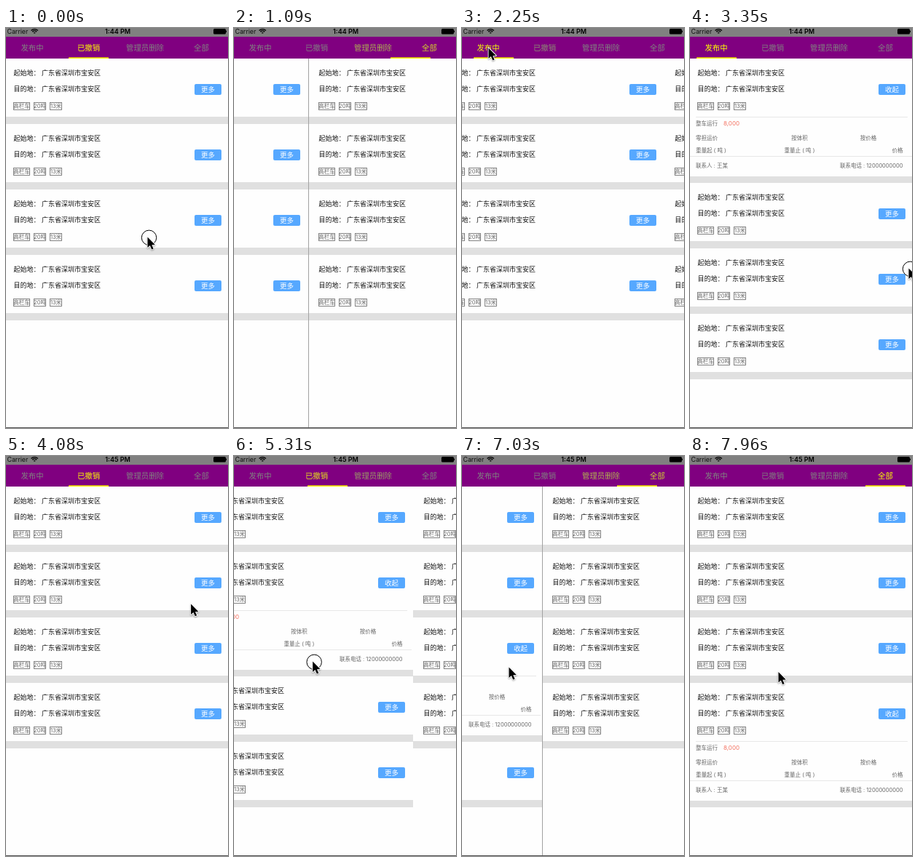
Animation of 305 by 550 pixels, one loop 8 s. Source, as an HTML page with a canvas:

```html
<!DOCTYPE html>
<html lang="zh-CN">
<head>
<meta charset="utf-8">
<title>Order tabs</title>
<style>
html, body { margin: 0; width: 100%; height: 100%; overflow: hidden; background: #fefefe; }
canvas { display: block; width: 305px; height: 550px; }
</style>
</head>
<body>
<canvas id="stage"></canvas>
<script>
const W = 305, H = 550, LOOP = 8000;
const PAGE_STEP = 311, PAGE_LEFT = -4;
const LIST_TOP = 42, ROW = 90, DETAIL = 81;
const TAB_X = 36, TAB_STEP = 77.5;
const FONT = 'Inter, "Noto Sans CJK SC", "Noto Sans CJK", "Noto Sans CJK JP", sans-serif';
const TABS = ['发布中', '已撤销', '管理员删除', '全部'];
const TAGS = ['高栏车', '20吨', '13米'];

// Gesture timing in ms, distances in px.
const HOLD = 60, DRAG = 150, SETTLE = 330, PRESS = 100, LEAD = 40;
const REACH = 130, SLOP = 8;
const CLOCK_CHANGE = 3720;

const clamp = u => Math.min(1, Math.max(0, u));
const easeOut = u => 1 - (1 - u) ** 3;
const easeBoth = u => (1 - Math.cos(Math.PI * u)) / 2;

const swipe = (at, x, y) => ({ at, x, y, drag: true, press: HOLD + DRAG, rest: SETTLE });
const pickTab = (at, tab) => ({ at, x: TAB_X + TAB_STEP * tab, y: 27, tab, press: PRESS, rest: SETTLE });
const toggle = (at, row) => ({ at, x: 274, y: LIST_TOP + ROW * row + 40, row, press: PRESS, rest: 0 });
const moveTo = (at, x, y) => ({ at, x, y, press: 0, rest: 0 });

const GESTURES = [
  swipe(0, 194, 287),
  swipe(823, 104, 287),
  pickTab(1858, 0),
  toggle(2580, 0),
  swipe(3330, 300, 330),
  toggle(4208, 1),
  swipe(5171, 177, 282),
  toggle(6270, 2),
  swipe(6770, 194, 290),
  toggle(7540, 3),
  moveTo(LOOP, 121, 296.5)
];

const canvas = document.getElementById('stage');
const ctx = canvas.getContext('2d');
const dpr = window.devicePixelRatio || 1;
canvas.width = W * dpr;
canvas.height = H * dpr;

// Replays the gestures up to time t.
function stateAt(t) {
  const s = { page: 1, x: 0, y: 0, pressed: false, open: [] };
  let free = 0;
  for (const g of GESTURES) {
    if (t < g.at) {
      const u = easeBoth(clamp((t - free) / (g.at - LEAD - free)));
      s.x += (g.x - s.x) * u;
      s.y += (g.y - s.y) * u;
      break;
    }
    const age = t - g.at;
    const settle = clamp((age - g.press) / SETTLE);
    s.x = g.x;
    s.y = g.y;
    s.pressed = age < g.press;
    if (g.drag) {
      const moved = REACH * clamp((age - HOLD) / DRAG);
      const dragged = Math.max(0, moved - SLOP) / PAGE_STEP;
      s.x -= moved;
      s.page += dragged + (1 - dragged) * easeOut(settle);
    }
    if (g.tab !== undefined) s.page += (g.tab - s.page) * easeBoth(settle);
    if (g.row !== undefined && !s.pressed) s.open.push(g.row);
    free = g.at + g.press + g.rest;
  }
  return s;
}

function rect(x, y, w, h, color) {
  ctx.fillStyle = color;
  ctx.fillRect(x, y, w, h);
}

function pill(x, y, w, h, r, color) {
  ctx.fillStyle = color;
  ctx.beginPath();
  ctx.roundRect(x, y, w, h, r);
  ctx.fill();
}

function text(str, x, cy, size, color, align = 'left', weight = 400) {
  ctx.font = `${weight} ${size}px ${FONT}`;
  ctx.textAlign = align;
  ctx.fillStyle = color;
  ctx.fillText(str, x, cy + size * 0.38);
}

function drawDetail(y) {
  const small = (str, x, dy, align) => text(str, x, y + dy, 7.5, '#666', align);
  rect(8, y + 80, 291, 1, '#e8e8e8');
  small('整车运行', 8, 89);
  text('8,000', 46, y + 89, 8, '#f4705f');
  small('零担运价', 8, 109.5);
  small('按体积', 150.5, 109.5, 'center');
  small('按价格', 245, 109.5, 'center');
  small('重量起 ( 吨 )', 8, 126);
  small('重量止 ( 吨 )', 150.5, 126, 'center');
  small('价格', 292.5, 126, 'right');
  rect(0, y + 134, W, 1, '#e8e8e8');
  small('联系人 : 王某', 8, 147);
  small('联系电话 : 12000000000', 292.5, 147, 'right');
}

function drawTags(y) {
  ctx.strokeStyle = '#777';
  ctx.lineWidth = 0.9;
  let x = 10;
  for (const tag of TAGS) {
    const w = tag === TAGS[0] ? 23 : 17;
    ctx.strokeRect(x + 0.5, y + 60.5, w - 1, 10);
    text(tag, x + w / 2, y + 65.6, 7.5, '#666', 'center');
    x += w + 5;
  }
}

function drawRow(y, open) {
  ['起始地：', '目的地：'].forEach((label, i) => {
    const cy = y + 20 + 22 * i;
    text(label, 10.5, cy, 9, '#111');
    text('广东省深圳市宝安区', 49, cy, 9, '#111');
  });
  drawTags(y);
  pill(259, y + 35, 37, 15, 2, '#56a8ff');
  text(open ? '收起' : '更多', 277.5, y + 42.5, 9.5, '#fff', 'center');
  if (open) drawDetail(y);
  const gap = open ? 9 : 10;
  const bottom = y + ROW + (open ? DETAIL : 0);
  rect(PAGE_LEFT, bottom - gap, PAGE_STEP, gap, '#e0e0e0');
  return bottom;
}

function drawPage(index, { page, open }) {
  const x = (index - page) * PAGE_STEP;
  if (Math.abs(x) >= PAGE_STEP) return;
  ctx.save();
  ctx.translate(Math.round(x), 0);
  ctx.beginPath();
  ctx.rect(PAGE_LEFT, LIST_TOP, PAGE_STEP, H - LIST_TOP);
  ctx.clip();
  // Each page opens the row with its own index.
  let y = LIST_TOP;
  for (let row = 0; row < 4; row++) y = drawRow(y, row === index && open.includes(row));
  if (index === 3) rect(PAGE_LEFT, LIST_TOP, 1, H, '#a2a2a2');
  ctx.restore();
}

function drawStatus(t) {
  rect(0, 0, W, 12, '#808080');
  text('Carrier', 1.5, 5, 8.8, '#111');
  text(t < CLOCK_CHANGE ? '1:44 PM' : '1:45 PM', 153.5, 5, 9, '#000', 'center', 600);
  ctx.strokeStyle = '#000';
  ctx.lineWidth = 1.4;
  for (const r of [6.6, 4.2, 1.6]) {
    ctx.beginPath();
    ctx.arc(39.2, 8.2, r, -Math.PI * 0.75, -Math.PI * 0.25);
    ctx.stroke();
  }
  pill(285, 1, 17, 7.5, 1.5, '#000');
  rect(302, 3.6, 1, 2.4, '#000');
}

function drawHeader(page) {
  rect(0, 12, W, 30, '#800080');
  TABS.forEach((label, i) => {
    const on = Math.max(0, 1 - Math.abs(page - i));
    const light = Math.round(128 + 127 * on);
    const blue = Math.round(128 * (1 - on));
    text(label, TAB_X + TAB_STEP * i, 27, 10.4, `rgb(${light},${light},${blue})`, 'center');
  });
  rect(Math.round(TAB_X + TAB_STEP * page - 27.5), 40.4, 55, 1.6, '#ff0');
}

function drawPointer({ x, y, pressed }) {
  ctx.save();
  ctx.translate(x, y);
  if (pressed) {
    ctx.strokeStyle = '#000';
    ctx.lineWidth = 1;
    ctx.beginPath();
    ctx.arc(2.5, 1.3, 10.2, 0, Math.PI * 2);
    ctx.stroke();
  }
  const arrow = new Path2D('M.5 .5V15L3.8 12 6.2 17.4 8.6 16.4 6.3 11.2 10.8 11Z');
  ctx.lineJoin = 'round';
  ctx.shadowColor = 'rgba(0,0,0,.35)';
  ctx.shadowBlur = 2 * dpr;
  ctx.shadowOffsetY = dpr;
  ctx.strokeStyle = '#fff';
  ctx.lineWidth = 1.8;
  ctx.stroke(arrow);
  ctx.shadowColor = 'transparent';
  ctx.fillStyle = '#000';
  ctx.fill(arrow);
  ctx.restore();
}

function draw(t) {
  const state = stateAt(t);
  ctx.setTransform(dpr, 0, 0, dpr, 0, 0);
  rect(0, 0, W, H, '#fefefe');
  TABS.forEach((_, i) => drawPage(i, state));
  drawHeader(state.page);
  drawStatus(t);
  rect(0, 549, W, 1, '#555');
  drawPointer(state);
}

const start = performance.now();
function tick() {
  draw((performance.now() - start) % LOOP);
  requestAnimationFrame(tick);
}
tick();
</script>
</body>
</html>
```
